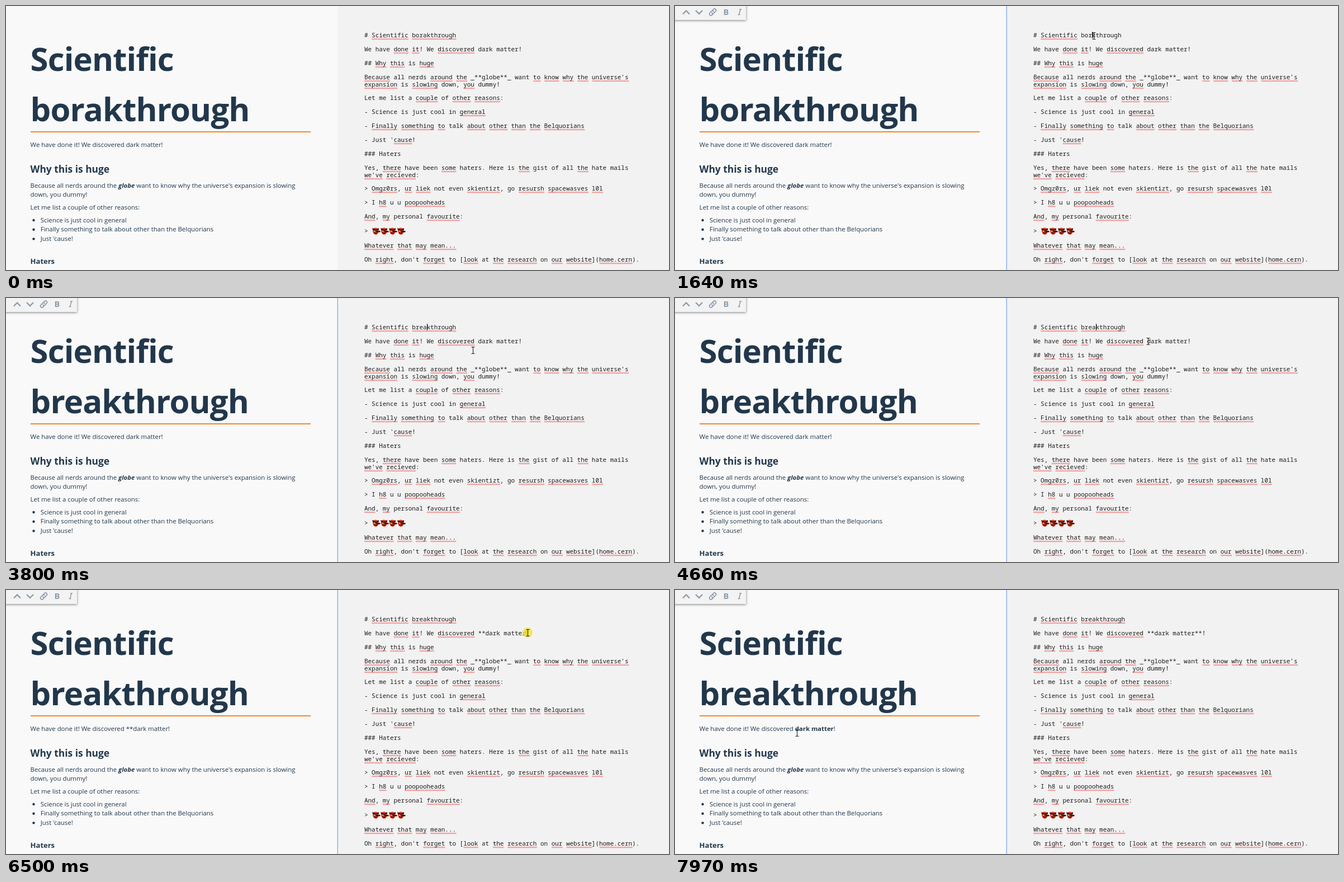
An HTML page that plays this animation: 1186x472 px, repeating every 8 s.

```html
<!DOCTYPE html>
<html lang="en">
<head>
<meta charset="utf-8">
<title>Markdown editor</title>
<style>
  html, body { margin: 0; height: 100%; overflow: hidden; background: #f9f9f9; }
  svg { display: block; width: 100vw; height: 100vh; }
  text { white-space: pre; }
  #preview text { font: 11.4px "Open Sans", "Noto Sans", sans-serif; fill: #22374b; }
  #preview .h1 { font-size: 58px; font-weight: 700; letter-spacing: -.85px; }
  #preview .h2 { font-size: 17.4px; font-weight: 700; }
  #preview .h3 { font-size: 13px; font-weight: 700; }
  .strong { font-weight: 700; }
  .em { font-style: italic; }
  #editor text { font: 10.95px "Noto Sans Mono", "DejaVu Sans Mono", monospace; fill: #1c1c1c; }
  #bar { fill: none; stroke: #8d9dac; stroke-width: 2.4; }
  #bar text { font: 700 14.5px "Open Sans", sans-serif; fill: #8d9dac; stroke: none; }
  #mouse { fill: none; stroke: #222; stroke-width: 1.1; }
</style>
</head>
<body>
<svg viewBox="0 0 1186 472" preserveAspectRatio="none">
  <defs>
    <pattern id="wave" width="4" height="3" patternUnits="userSpaceOnUse">
      <path d="M-1 3L1 .8L3 2.6L5 .8" fill="none" stroke="#e33" stroke-width="1"/>
    </pattern>
    <filter id="shadow" x="-20%" y="-50%" width="150%" height="220%">
      <feDropShadow dx="0" dy="1" stdDeviation="2" flood-opacity=".5"/>
    </filter>
    <g id="mask">
      <path d="M1 2Q6 -1 11 2L12 7Q11 12 6.500 13Q2 12 1 7Z" fill="#d83a24"/>
      <path d="M0 1L5 3.500H8L12 1V4L8 5.500H5L1 4.500ZM3 9.500H9V11H3Z" fill="#241815"/>
      <path d="M7 6H14.500V8.500H7Z" fill="#241815"/>
      <path d="M3 6H5V7H3Z" fill="#fff"/>
    </g>
  </defs>
  <rect width="1186" height="472" fill="#f9f9f9"/>
  <rect x="593.500" width="593" height="472" fill="#f2f2f2"/>
  <rect id="divider" x="592.500" width="1.500" height="472" fill="#8fb3ea"/>
  <g id="preview">
    <rect x="44" y="224" width="501" height="2" fill="#f08a28"/>
  </g>
  <g id="bar">
    <rect x="-8" y="-8" width="135" height="33" fill="#f3f3f3" stroke="none" filter="url(#shadow)"/>
    <path d="M14 14.500L20 8.500L26 14.500M37 8L43 14L49 8"/>
    <g transform="translate(67.500 11) rotate(-45)" stroke-width="1.700">
      <path d="M-1.500 2.700H-4.500A2.700 2.700 0 0 1 -4.500 -2.700H-.5A2.700 2.700 0 0 1 2 1"/>
      <path d="M1.500 -2.700H4.500A2.700 2.700 0 0 1 4.500 2.700H.5A2.700 2.700 0 0 1 -2 -1"/>
    </g>
    <text x="86.500" y="16">B</text>
    <path d="M117 6L114.500 15.500M115 6H119M112.500 15.500H116.500" stroke-width="1.500"/>
  </g>
  <g id="editor"></g>
  <rect id="caret" width="1" height="12" fill="#111"/>
  <circle id="click" r="9" fill="#f3e52c" opacity=".78"/>
  <path id="mouse" d="M-3 -6H-1L0 -5L1 -6H3M0 -5V5M-3 6H-1L0 5L1 6H3"/>
</svg>
<script>
const LOOP = 8000, LEFT = 641, CELL = 6.573;
const $ = id => document.getElementById(id);

function add(parent, tag, attrs, text = '') {
  const node = document.createElementNS('http://www.w3.org/2000/svg', tag);
  for (const key in attrs) node.setAttribute(key, attrs[key]);
  node.textContent = text;
  return parent.appendChild(node);
}

// Preview pane: [text, class] runs sharing one baseline
function rich(x, y, ...runs) {
  const line = add($('preview'), 'text', { x, y });
  setRuns(line, runs);
  return line;
}
function setRuns(line, runs) {
  line.textContent = '';
  for (const [text, cls = ''] of runs) add(line, 'tspan', { class: cls }, text);
}
function heading(cls, y, text) {
  return add($('preview'), 'text', { class: cls, x: 43.6, y }, text);
}

heading('h1', 116, 'Scientific');
const bigWord = heading('h1', 206, '');
const intro = rich(43.6, 252);
heading('h2', 297.5, 'Why this is huge');
rich(43.6, 324.5, ['Because all nerds around the '], ['globe', 'strong em'],
  [" want to know why the universe's expansion is slowing"]);
rich(43.6, 341, ['down, you dummy!']);
rich(43.6, 363.5, ['Let me list a couple of other reasons:']);
['Science is just cool in general',
 'Finally something to talk about other than the Belquorians',
 "Just 'cause!"].forEach((item, i) => {
  const y = 386.5 + i * 16.7;
  add($('preview'), 'circle', { cx: 49.5, cy: y - 3.5, r: 2.2, fill: '#22374b' });
  rich(61.8, y, [item]);
});
heading('h3', 461, 'Haters');

// Editor pane: "~" marks a word flagged by the spell checker
function write(group, y, source) {
  group.textContent = '';
  let text = '';
  for (const part of source.split(/(~[\w'.]+)/)) {
    if (part[0] === '~') {
      const width = (part.length - 1) * CELL;
      add(group, 'rect', { width, height: 3, fill: 'url(#wave)',
        transform: `translate(${LEFT + text.length * CELL} ${Math.round(y) + 1.5})` });
      text += part.slice(1);
    } else text += part;
  }
  add(group, 'text', { x: LEFT, y }, text);
}
function row(y, source = '') {
  const group = add($('editor'), 'g', {});
  if (source) write(group, y, source);
  return group;
}

const TITLE_Y = 56, INTRO_Y = 81;
const titleRow = row(TITLE_Y), introRow = row(INTRO_Y);
[[106, '## ~Why ~this is ~huge'],
 [131, "~Because all nerds ~around ~the _**globe**_ want ~to ~know ~why ~the ~universe's"],
 [143.5, '~expansion is ~slowing down, ~you dummy!'],
 [168, 'Let me list a ~couple of ~other ~reasons:'],
 [193, '- Science is just cool in ~general'],
 [218, '- ~Finally ~something ~to talk ~about ~other ~than ~the ~Belquorians'],
 [243, "- Just '~cause!"],
 [268, '### Haters'],
 [293, 'Yes, ~there have been ~some haters. Here is ~the gist of all ~the hate mails'],
 [305.5, "~we've ~recieved:"],
 [330, '> ~Omgz0rs, ~ur ~liek not even ~skientizt, go ~resursh ~spacewasves ~l0l'],
 [355, '> I ~h8 u u ~poopooheads'],
 [380, '~And, ~my personal ~favourite:'],
 [406, '> '],
 [432, '~Whatever ~that ~may ~mean...'],
 [456.5, "Oh ~right, don't ~forget to [~look at ~the ~research on ~our ~website](~home.cern)."]
].forEach(args => row(...args));
for (let i = 0; i < 4; i++)
  add($('editor'), 'use', { href: '#mask', x: 655 + i * 15, y: 396 });

// Timelines: the last entry already reached is in force
const at = (list, t) => list.findLast(entry => entry[0] <= t);

const titles = [[0, '~borakthrough'], [1640, 'borkthrough'], [1790, 'bokthrough'],
  [2180, 'bkthrough'], [2260, 'brkthrough'], [2330, 'brekthrough'],
  [2410, 'breakthrough'], [3330, '~breakthrough']];
const intros = [[0, 'dark matter!'], [5440, '*dark matter!'], [5590, '**dark matter!'],
  [6740, '**dark matter*!'], [6820, '**dark matter**!']];
const plain = 'We have done it! We discovered ';
const previews = [[0, [[plain + 'dark matter!']]], [6130, [[plain + '**dark matter!']]],
  [7370, [[plain], ['dark matter', 'strong'], ['!']]]];
const bigWords = [[0, 'borakthrough'], [2960, 'breakthrough']];

// [time, column, baseline]; no column means hidden
const carets = [[0], [830, 16, TITLE_Y], [1330], [1430, 17, TITLE_Y], [1640, 16, TITLE_Y],
  [1790], [1950, 15, TITLE_Y], [2180, 14, TITLE_Y], [2260, 15, TITLE_Y],
  [2330, 16, TITLE_Y], [2410, 17, TITLE_Y], [2960], [3410, 17, TITLE_Y], [4030],
  [4500, 17, TITLE_Y], [4810, 31, INTRO_Y], [5290], [5440, 32, INTRO_Y],
  [5590, 33, INTRO_Y], [6130], [6430, 44, INTRO_Y], [6740, 45, INTRO_Y],
  [6820, 46, INTRO_Y], [7320]];
const clicks = [[540, 770], [4810, 4890], [6430, 6590]];

// [start, end, steps, path points]
const moves = [
  [70, 150, 2, [[1167, 647], [1005, 358], [843, 62]]],
  [390, 390, 1, [[749, 52.5]]],
  [3330, 3800, 7, [[749, 52.5], [790, 74], [835, 92.5]]],
  [4030, 4660, 9, [[835, 92.5], [871, 88], [862, 80], [846, 77]]],
  [5670, 6040, 6, [[846, 77], [960, 88], [1042, 100], [947, 79]]],
  [6130, 6360, 4, [[947, 79], [933, 76]]],
  [6900, 7510, 9, [[933, 76], [957, 84], [650, 200], [332, 330]]],
  [7590, 7970, 6, [[332, 330], [262, 290], [218, 255]]]];

function mouseAt(t) {
  const move = at(moves, t);
  if (!move || (t >= 220 && t < 390)) return null;
  const [start, end, steps, path] = move;
  const gap = (end - start) / (steps - 1) || 1;
  const done = Math.min(steps, Math.floor((t - start) / gap + 1e-6) + 1) / steps;
  const pos = done * (path.length - 1);
  const i = Math.min(Math.floor(pos), Math.max(0, path.length - 2));
  const a = path[i], b = path[i + 1] || a;
  return a.map((v, k) => v + (b[k] - v) * (pos - i));
}

const ramp = (t, from, to) => Math.max(0, Math.min(1, (t - from) / (to - from)));
const show = (node, on) => node.setAttribute('visibility', on ? 'visible' : 'hidden');
const place = (node, x, y) => node.setAttribute('transform', `translate(${x} ${y})`);

const shown = new Map();
function update(key, value, apply) {
  if (shown.get(key) === value) return;
  shown.set(key, value);
  apply(value);
}

function draw(t) {
  update('title', at(titles, t)[1], s => write(titleRow, TITLE_Y, '# ~Scientific ' + s));
  update('intro', at(intros, t)[1],
    s => write(introRow, INTRO_Y, 'We have ~done ~it! We ~discovered ' + s));
  update('big', at(bigWords, t)[1], s => bigWord.textContent = s);
  update('preview', at(previews, t)[1], runs => setRuns(intro, runs));

  $('divider').setAttribute('opacity', ramp(t, 470, 830));
  $('bar').setAttribute('opacity', t < 1000 ? 0 : t < 1100 ? .5 : 1);

  const [, col, base] = at(carets, t);
  show($('caret'), col !== undefined);
  if (col !== undefined) place($('caret'), Math.round(LEFT + col * CELL), base - 10);

  const mouse = mouseAt(t);
  show($('mouse'), mouse);
  show($('click'), mouse && clicks.some(([from, to]) => t >= from && t < to));
  if (mouse) {
    const [x, y] = mouse.map(Math.round);
    place($('mouse'), x + .5, y + .5);
    place($('click'), x, y);
  }
}

function tick() {
  draw(performance.now() % LOOP);
  requestAnimationFrame(tick);
}
tick();
</script>
</body>
</html>
```
